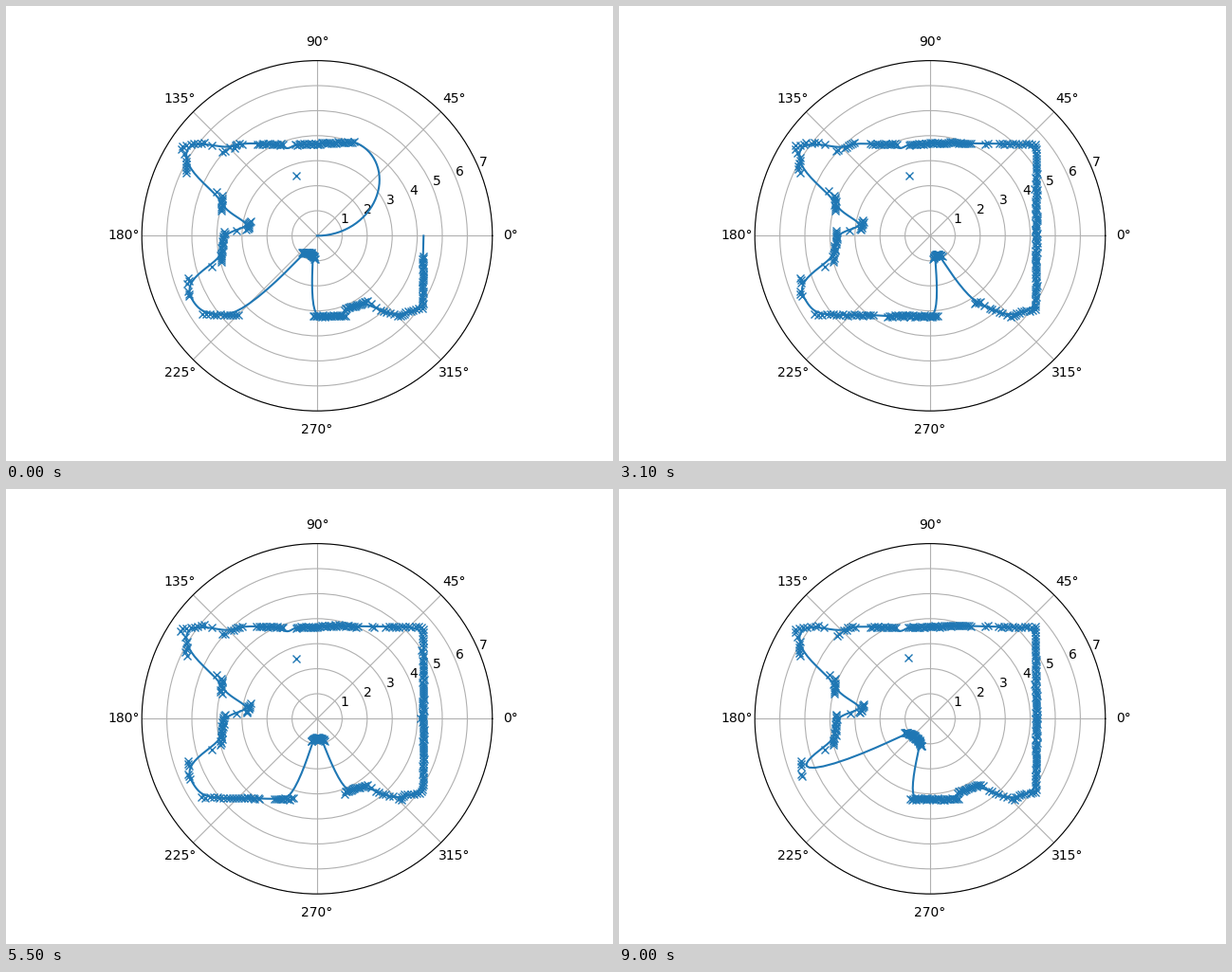
These frames come from a looping animation (640 by 480 pixels, 9100 ms). A matplotlib script:

```python
import numpy as np
import matplotlib.pyplot as plt
from matplotlib.animation import FuncAnimation

FRAMES, INTERVAL = 91, 100
CENTER = np.array([328, 242.4])
UNIT = 184.8 / 7  # pixels per metre
RAYS = np.arange(361)  # one ray per degree

# Corners of the room as the scanner sees them, counter-clockwise
CORNERS = [
    (440, 242.4), (440, 146), (371, 145), (350, 144), (308, 146), (246, 145),
    (228, 154), (213, 143), (184, 147), (191, 160), (190, 175), (228, 199),
    (227, 217), (258, 226), (254, 236), (230, 237), (226, 270), (192, 286),
    (192, 303), (206, 325), (300, 327), (357, 327), (357, 320), (381, 312),
    (390, 319), (415, 328), (422, 323), (439, 320), (440, 242.4),
]
POLE, POLE_RANGE = 109, 68

# Angles from which nothing is reflected
BLIND = [(53.5, 58), (59, 66), (103, 108.5), (123.5, 129), (134, 137),
         (154.5, 156), (165.5, 166.5), (196, 197.5), (200.5, 203),
         (205, 214), (234.5, 242)]

# Someone walking around the scanner: time step, direction, half width, distance
WALK = np.array([
    (0, 246, 20, 20), (19, 315, 8, 34), (31, 289, 13, 21),
    (46, 272, 18, 20), (70, 271, 18, 20), (90, 230, 25, 25),
])
FIRST_RAY = 67  # the very first sweep starts late


def scan_room(spacing=40):
    """Distance to the walls for every ray."""
    steps = np.arange(len(CORNERS))
    fine = np.linspace(0, steps[-1], steps[-1] * spacing + 1)
    x, y = (np.interp(fine, steps, axis) for axis in np.transpose(CORNERS))
    dx, dy = x - CENTER[0], CENTER[1] - y
    theta = np.degrees(np.unwrap(np.arctan2(dy, dx)))
    r = np.interp(RAYS, theta, np.hypot(dx, dy))
    r[POLE] = POLE_RANGE
    return r


def smooth(r, sigma=3):
    """Circular Gaussian filter over the angle."""
    reach = 3 * sigma
    kernel = np.exp(-.5 * (np.arange(-reach, reach + 1) / sigma) ** 2)
    ring = np.pad(r[:-1], reach, mode="wrap")
    out = np.convolve(ring, kernel / kernel.sum(), mode="valid")
    return np.append(out, out[0])


ROOM = scan_room()
OPEN = ~np.any([(RAYS > a) & (RAYS < b) for a, b in BLIND], axis=0)


def sweep(n):
    """Ranges of one full turn, and which rays came back."""
    rng = np.random.default_rng(700 + n)
    direction, half, distance = (np.interp(n, WALK[:, 0], col)
                                 for col in WALK.T[1:])
    u = (RAYS - direction) / half
    body = np.abs(u) < 1 - 1 / half
    r = np.where(body, distance * (1 + .25 * u ** 2), ROOM)
    r = r + rng.normal(0, .6, r.size)
    seen = body | (OPEN & (np.abs(u) > 1))
    theta = RAYS + rng.uniform(-.3, .3)
    return theta, r, seen


fig = plt.figure(figsize=(6.4, 4.8), dpi=100)
ax = fig.add_subplot(projection="polar")
marks, = ax.plot([], [], "x", color="C0")
line, = ax.plot([], [], color="C0")
ax.set_rlim(0, 7)
ax.set_rticks(range(1, 8))


def update(n):
    theta, r, seen = sweep(n)
    outline = smooth(r)
    if n == 0:
        seen &= (RAYS > FIRST_RAY) & (RAYS < 350)
        start = RAYS < FIRST_RAY
        rise = np.sin(np.pi / 2 * RAYS / FIRST_RAY)
        outline[start] = outline[FIRST_RAY] * rise[start]
    marks.set_data(np.radians(theta[seen]), r[seen] / UNIT)
    line.set_data(np.radians(RAYS), outline / UNIT)
    return marks, line


anim = FuncAnimation(fig, update, frames=FRAMES, interval=INTERVAL,
                     init_func=lambda: update(0), repeat=True, repeat_delay=0)
plt.show()
```
